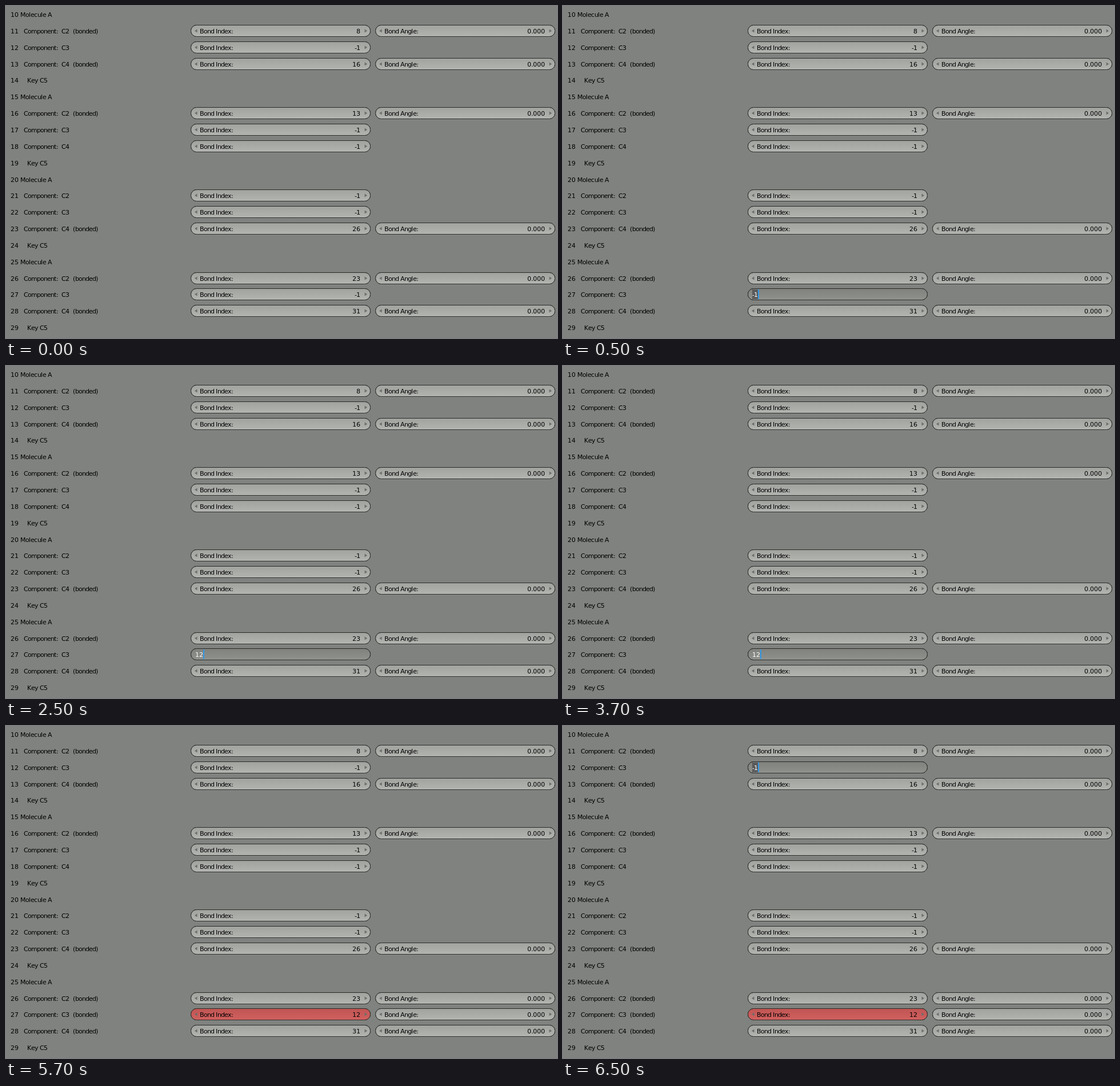
Write an HTML page with a canvas that moves like this. It is 964x581 px and loops after 8000 ms.

```html
<!DOCTYPE html>
<html lang="en">
<head>
<meta charset="utf-8">
<title>Bond index fields</title>
<style>
  html, body { margin: 0; width: 100%; height: 100%; overflow: hidden; background: #7f827e; }
  canvas { display: block; }
</style>
</head>
<body>
<canvas id="stage" width="964" height="581"></canvas>
<script>
const ctx = document.getElementById("stage").getContext("2d");
const LOOP = 8000, STEPS = [500, 2500, 4500, 6500];
const INDEX_X = 323, ANGLE_X = 646, FIELD_W = 314, FIELD_H = 20;
const FACE = '"DejaVu Sans", sans-serif';
const NORMAL = ["#a0a29e", "#b2b4b0"];
const EDIT = ["#7f817d", "#8f918d"];
const ALERT = ["#bf5553", "#d0605e"];

// Bond indices of C2, C3 and C4 in each molecule
const BONDS = [[8, -1, 16], [13, -1, -1], [-1, -1, 26], [23, -1, 31]];

const rowTop = i => Math.floor(4.6 + 28.84 * i);

// Glyph advances are cut down to whole pixels
const advances = {};
function advance(ch) {
  if (!(ch in advances)) {
    ctx.font = "1100px " + FACE;
    advances[ch] = Math.floor(ctx.measureText(ch).width / 100 + 0.01);
  }
  return advances[ch];
}

const textWidth = s => [...s].reduce((sum, ch) => sum + advance(ch), 0);

function text(s, x, y, color = "#000") {
  for (const ch of s) {
    const step = advance(ch);
    ctx.font = "11px " + FACE;
    ctx.fillStyle = color;
    ctx.fillText(ch, x, y + 15);
    x += step;
  }
}

function rect(x, y, w, h, color) {
  ctx.fillStyle = color;
  ctx.fillRect(x, y, w, h);
}

function pill(x, y, [top, bottom]) {
  const shade = ctx.createLinearGradient(0, y, 0, y + FIELD_H);
  shade.addColorStop(0, top);
  shade.addColorStop(1, bottom);
  const outline = (dy, color) => {
    ctx.beginPath();
    ctx.roundRect(x + 0.5, y + 0.5 + dy, FIELD_W, FIELD_H, FIELD_H / 2);
    ctx.strokeStyle = color;
    ctx.stroke();
  };
  outline(1, "rgba(255,255,255,.06)");
  outline(0, "#2a2b29");
  ctx.fillStyle = shade;
  ctx.fill();
  ctx.stroke();
}

function arrow(tip, base, y) {
  ctx.beginPath();
  ctx.moveTo(tip, y);
  ctx.lineTo(base, y - 3);
  ctx.lineTo(base, y + 3);
  ctx.fillStyle = "#6c6e6b";
  ctx.fill();
}

function numberField(x, y, label, value, colors = NORMAL) {
  pill(x, y, colors);
  arrow(x + 7, x + 11.5, y + 10.5);
  arrow(x + 309, x + 304.5, y + 10.5);
  text(label, x + 16, y);
  text(value, x + 297 - textWidth(value), y);
}

function editField(x, y, value, selected) {
  const start = x + 8, width = textWidth(value);
  pill(x, y, EDIT);
  if (selected) rect(start, y + 2, width, 17, "#5a5a5a");
  text(value, start, y, "#fff");
  rect(start + width, y + 2, 2, 17, "#3399e6");
}

function component(row, name, bond, step) {
  const y = rowTop(row);
  const target = row === 17;
  const linked = target && step >= 3;
  if (linked) bond = 12;
  const bonded = bond >= 0;
  text(`${row + 10}   Component:  ${name}${bonded ? "  (bonded)" : ""}`, 8, y);

  if (target && step === 2) editField(INDEX_X, y, "12", false);
  else if (target && step === 1 || row === 2 && step === 4) editField(INDEX_X, y, "-1", true);
  else numberField(INDEX_X, y, "Bond Index:", String(bond), linked ? ALERT : NORMAL);

  if (bonded) numberField(ANGLE_X, y, "Bond Angle:", "0.000");
}

function draw(step) {
  rect(0, 0, 964, 581, "#7f827e");
  BONDS.forEach((bonds, m) => {
    const row = m * 5;
    text(`${row + 10} Molecule A`, 8, rowTop(row));
    bonds.forEach((bond, i) => component(row + 1 + i, "C" + (i + 2), bond, step));
    text(`${row + 14}     Key C5`, 8, rowTop(row + 4));
  });
}

ctx.fontKerning = "none";
const start = performance.now();
function tick() {
  const t = (performance.now() - start) % LOOP;
  draw(STEPS.filter(s => t >= s).length);
  requestAnimationFrame(tick);
}
tick();
</script>
</body>
</html>
```
